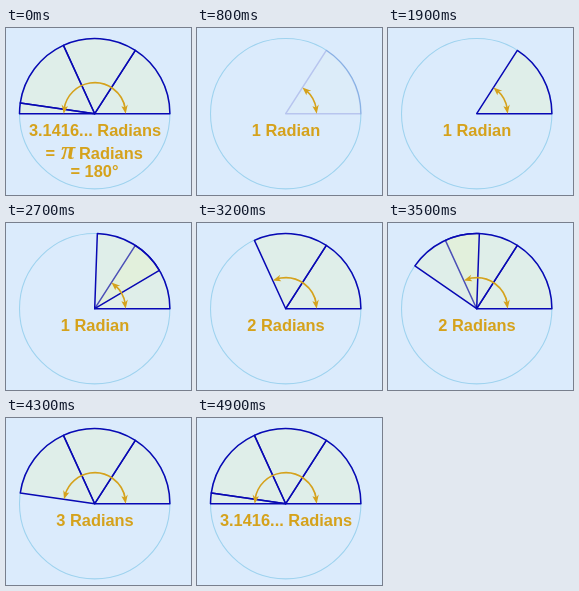
These frames come from a looping animation (185x167 px, 5000 ms). An HTML page with a canvas:

```html
<!DOCTYPE html>
<html lang="en">
<head>
<meta charset="utf-8">
<title>Radians in a half circle</title>
<style>
html, body { margin: 0; width: 100%; height: 100%; overflow: hidden; background: #dbebfc; }
canvas { display: block; width: 185px; height: 167px; }
</style>
</head>
<body>
<canvas id="stage"></canvas>
<script>
const LOOP = 5000, STEP = 100;
const CX = 88.7, CY = 85.7, R = 75.2, ARROW_R = 31;
const GOLD = '#d5a21c', SANS = 'bold 16.4px "Liberation Sans", Arial, sans-serif';
const canvas = document.getElementById('stage');
const ctx = canvas.getContext('2d');
const ratio = window.devicePixelRatio || 1;
canvas.width = 185 * ratio;
canvas.height = 167 * ratio;
ctx.scale(ratio, ratio);

const progress = (t, start, end) => Math.min(1, Math.max(0, (t - start) / (end - start)));
const at = (r, a) => [CX + r * Math.cos(a), CY - r * Math.sin(a)];

function slice(from, size = 1, alpha = 1) {
  ctx.globalAlpha = alpha;
  ctx.beginPath();
  ctx.moveTo(CX, CY);
  ctx.arc(CX, CY, R, -from, -from - size, true);
  ctx.closePath();
  ctx.fillStyle = 'rgba(230, 245, 190, 0.3)';
  ctx.fill();
  ctx.strokeStyle = '#0808b4';
  ctx.lineWidth = 1.5;
  ctx.lineJoin = 'round';
  ctx.stroke();
  ctx.globalAlpha = 1;
}

// Arrowhead whose tip lies on the arc at angle a; dir is the way it points.
function head(a, dir) {
  const back = a - dir * 0.27;
  ctx.beginPath();
  ctx.moveTo(...at(ARROW_R, a));
  ctx.lineTo(...at(ARROW_R + 3.3, back));
  ctx.lineTo(...at(ARROW_R, a - dir * 0.2));
  ctx.lineTo(...at(ARROW_R - 3.3, back));
  ctx.fill();
}

function arrow(angle) {
  ctx.strokeStyle = ctx.fillStyle = GOLD;
  ctx.lineWidth = 1.6;
  ctx.beginPath();
  ctx.arc(CX, CY, ARROW_R, -0.15, -angle + 0.15, true);
  ctx.stroke();
  head(0, -1);
  head(angle, 1);
}

function write(text, x, y, align = 'center', font = SANS) {
  ctx.font = font;
  ctx.textAlign = align;
  ctx.fillStyle = GOLD;
  ctx.fillText(text, x, y);
}

function draw(t) {
  ctx.fillStyle = '#dbebfc';
  ctx.fillRect(0, 0, 185, 167);
  ctx.beginPath();
  ctx.arc(CX, CY, R, 0, 2 * Math.PI);
  ctx.strokeStyle = '#9fd3ef';
  ctx.lineWidth = 1.1;
  ctx.stroke();

  const summary = t < 700;
  const full = summary || t >= 4900;
  const second = progress(t, 2400, 2960);
  const third = progress(t, 3200, 3760);
  const rest = progress(t, 4300, 4800);

  slice(0, 1, summary ? 1 : progress(t, 700, 1300));
  if (summary || second) slice(summary ? 1 : second);
  if (summary || third) slice(summary ? 2 : 1 + third);
  if (summary || rest) slice(3, (Math.PI - 3) * (summary ? 1 : rest));

  const count = full ? Math.PI : t >= 3800 ? 3 : t >= 3000 ? 2 : 1;
  arrow(count);
  write(full ? '3.1416... Radians' : count + (count > 1 ? ' Radians' : ' Radian'), 89, 108);
  if (summary) {
    write('=', 39.5, 130.5, 'left');
    write('π', 62, 130.5, 'center', 'italic bold 26px "Liberation Serif", "Times New Roman", serif');
    write('Radians', 73, 130.5, 'left');
    write('= 180°', 88.5, 149);
  }
}

function tick() {
  const t = performance.now() % LOOP;
  draw(Math.floor(t / STEP) * STEP);
  requestAnimationFrame(tick);
}
tick();
</script>
</body>
</html>
```
